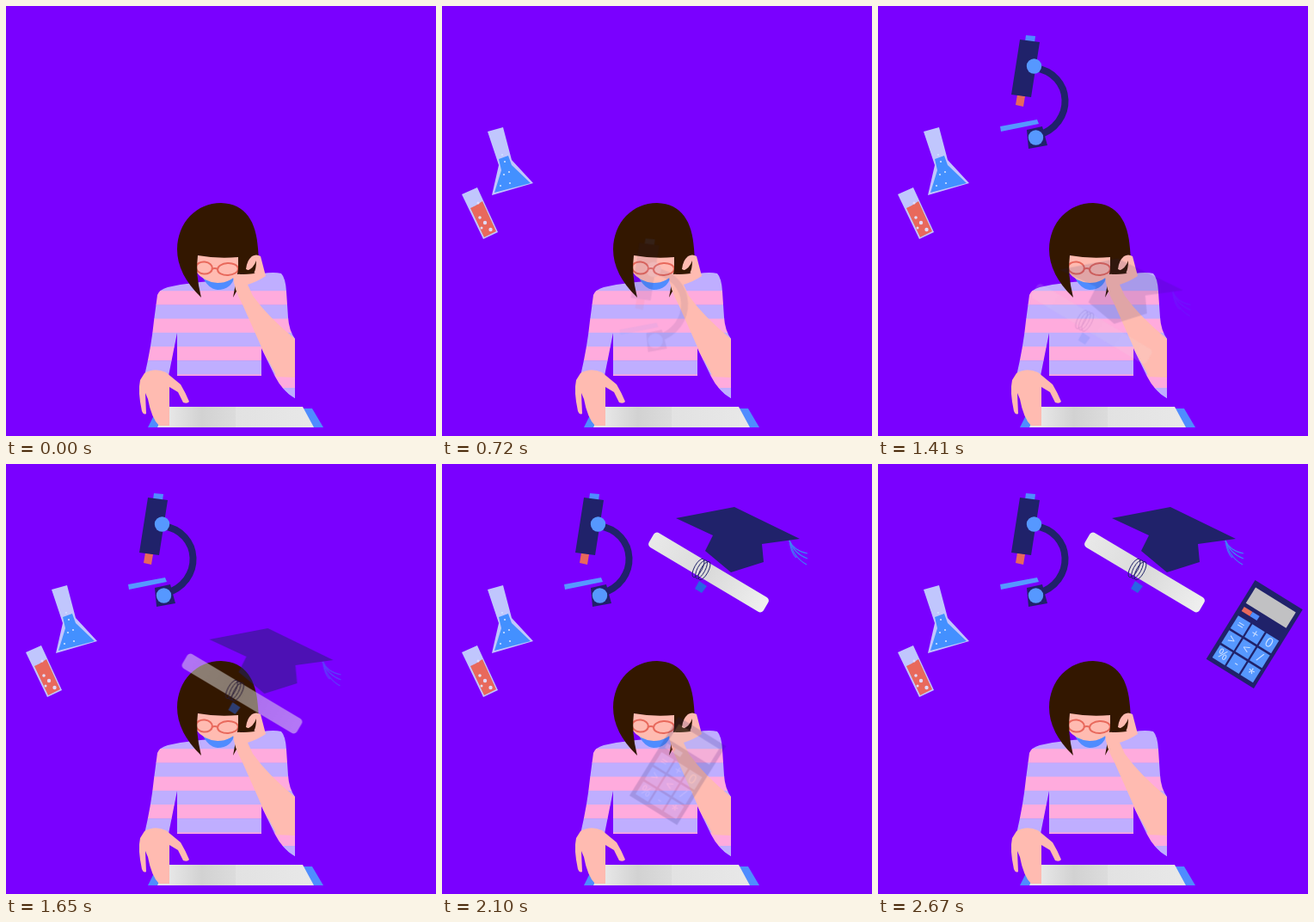
Animation of 500x500 px, one loop 2.88 s. Source, as an HTML page with a canvas:

```html
<!DOCTYPE html>
<html lang="en">
<head>
<meta charset="utf-8">
<title>Study time</title>
<style>
html, body { margin: 0; width: 100%; height: 100%; overflow: hidden; background: #7a00ff; }
canvas { display: block; width: 500px; height: 500px; }
</style>
</head>
<body>
<canvas id="stage" width="500" height="500"></canvas>
<script>
const SIZE = 500, LOOP = 2880, TICK = 30, FLIGHT = 660;
const C = {
  bg: '#7a00ff', skin: '#ffbbb1', hair: '#331700', pink: '#ffabdd', lilac: '#bfaeff',
  blue: '#4f8cff', sky: '#5698ff', navy: '#20226a', coral: '#e8695c', glass: '#c0c6fd'
};

function makeLayer() {
  const canvas = document.createElement('canvas');
  canvas.width = canvas.height = SIZE;
  return canvas;
}

function fill(g, path, color) {
  g.fillStyle = color;
  g.fill(new Path2D(path));
}

function line(g, path, color, width) {
  g.strokeStyle = color;
  g.lineWidth = width;
  g.stroke(new Path2D(path));
}

function oval(g, x, y, rx, ry = rx, turn = 0) {
  g.beginPath();
  g.ellipse(x, y, rx, ry, turn, 0, Math.PI * 2);
}

function dot(g, x, y, r, color) {
  oval(g, x, y, r);
  g.fillStyle = color;
  g.fill();
}

function shade(g, x0, y0, x1, y1, ...colors) {
  const ramp = g.createLinearGradient(x0, y0, x1, y1);
  colors.forEach((c, i) => ramp.addColorStop(i / (colors.length - 1), c));
  return ramp;
}

function drawSweater(g) {
  g.save();
  g.clip(new Path2D(`M176 336Q178 330 188 327Q206 323 226 321L266 318L298 311Q312 309 320 311
    Q325 316 326 332L328 362Q329 377 336 387V456Q321 447 313 431L297 398V430H199V380L189 430H161
    Q169 396 172 366Z`));
  for (let i = 0; i < 10; i++) {
    g.fillStyle = i % 2 ? C.pink : C.lilac;
    g.fillRect(150, 315 + i * 16.2 - (i ? 0 : 15), 200, i ? 16.7 : 32);
  }
  g.restore();
}

function drawBook(g) {
  fill(g, 'M165 490L176 468H356L369 490Z', C.blue);
  fill(g, 'M176 490L188 466H267V490Z', shade(g, 188, 0, 267, 0, '#e8e8e8', '#d2d2d2', '#dcdcdc'));
  fill(g, 'M267 466H345L358 490H267Z', shade(g, 267, 0, 355, 0, '#e2e2e2', '#e8e8e8'));
}

function drawGirl(g) {
  drawBook(g);
  drawSweater(g);
  fill(g, 'M228 314H266Q262 330 246 330Q235 329 228 314Z', C.blue);
  fill(g, 'M220 286H272V308Q262 322 246 322Q230 321 221 309Z', C.skin);

  g.strokeStyle = C.coral;
  g.lineWidth = 2;
  oval(g, 230.5, 304.5, 9.5, 7, 0.1);
  g.stroke();
  oval(g, 258, 306, 12, 7, -0.05);
  g.stroke();
  line(g, 'M239 306Q243 304 246 306', C.coral, 2);

  fill(g, `M227 339Q199 312 199 283C199.5 251 222 229 250 229C279 230 291 251 293 282L295 308L286 313
    Q275 318 264 339L270 306V292Q245 294 223 290Q220 311 227 339Z`, C.hair);

  // Raised arm and hand
  fill(g, `M264 315Q267 311 273 312L290 311L279 306Q280 296 286 291Q291 288 296 291L302 314
    Q293 320 281 324L287 337Q305 362 336 387V443Q325 440 315 431L299 401L275 347Q265 329 264 315Z`, C.skin);
  fill(g, 'M280 308Q288 305 291 296Q291 306 288 311L274 312Z', C.hair);
  fill(g, 'M314 431L336 432V444H322Z', C.pink);
  fill(g, 'M322 444H336V456Q327 451 322 444Z', C.lilac);

  // Hand on the book
  fill(g, `M161 427Q173 420 186 426L203 440Q209 450 213 460Q211 463 206 461L200 449L190 443V488H178
    Q169 479 165 457L162 450L163 474Q160 476 158 471Q153 448 156 435Z`, C.skin);
}

function drawGlassware(g) {
  fill(g, 'M53 146L71 141L81 179L106 206L58 220L66 185Z', C.glass);
  fill(g, 'M66 178L77 174L81 185L103 206L61 217L69 191Z', '#4390ff');
  [[73, 181], [78, 193], [72, 196], [79, 206], [70, 173], [68, 209]]
    .forEach(([x, y]) => dot(g, x, y, 1.1, '#cfe0ff'));
  fill(g, 'M23 219L41 211L65 263L48 271Z', C.glass);
  fill(g, 'M33 235Q40 232 47 227L63 262L49 269Z', C.coral);
  [[44, 246, 1.8], [50, 252, 2.2], [46, 258, 1.5], [56.5, 260, 2.2], [42, 229, 1.5]]
    .forEach(([x, y, r]) => dot(g, x, y, r, '#e0dcfa'));
}

function drawMicroscope(g) {
  line(g, 'M182 72C227 78 231 138 184 151', C.navy, 8);
  fill(g, 'M172 34L183 35L182 43L171 41Z', C.blue);
  fill(g, 'M162 103L171 105L169 117L160 115Z', C.coral);
  fill(g, 'M165 39L188 42L178 106L155 103Z', C.navy);
  fill(g, 'M173 144L191 140L197 162L175 166Z', C.navy);
  fill(g, 'M142 140L185 132L187 137L143 146Z', C.sky);
  dot(g, 181.5, 70, 8.7, C.sky);
  dot(g, 183.5, 153, 8.7, C.sky);
}

function drawGraduation(g) {
  fill(g, 'M272 63L340 50L416 87L372 93L374 114L336 126L306 101L315 83Z', C.navy);
  ['M404 89Q409 101 425 104', 'M404 89Q409 104 425 110', 'M404 89Q408 108 424 117', 'M404 89Q406 104 412 109']
    .forEach(p => line(g, p, '#3f80f5', 1.2));

  g.save();
  g.translate(310, 126);
  g.rotate(0.537);
  g.beginPath();
  g.roundRect(-77.5, -9.8, 155, 19.6, 4.5);
  g.fillStyle = shade(g, -77, 0, 77, 0, '#e9e9e9', '#dadada', '#efefef');
  g.fill();
  g.restore();

  g.strokeStyle = C.navy;
  g.lineWidth = 1;
  for (let i = 0; i < 3; i++) {
    oval(g, 298 + i * 3.5, 121 + i * 1.5, 4.5, 12, 0.5);
    g.stroke();
  }
  fill(g, 'M299 136L308 142L302 150L294 145Z', '#2865e4');
}

function drawCalculator(g) {
  const box = (x, y, w, h, color) => {
    g.fillStyle = color;
    g.fillRect(x, y, w, h);
  };
  g.save();
  g.translate(438.5, 135);
  g.rotate(0.554);
  box(0, 0, 65, 108, C.navy);
  box(5, 7, 55, 21.5, '#c1c1c3');
  box(5.5, 33, 11.5, 6, C.coral);
  box(17, 33, 9.5, 6, C.blue);
  g.font = '15px "Open Sans", sans-serif';
  g.textAlign = 'center';
  g.textBaseline = 'middle';
  [...'=+0><\/%-*'].forEach((sign, i) => {
    const x = 13.5 + i % 3 * 19.3, y = 54 + Math.floor(i / 3) * 20;
    box(x - 8.5, y - 8.7, 17, 17.4, C.sky);
    g.fillStyle = '#cfe0ff';
    g.fillText(sign, x, y + (sign === '*' ? 2 : 0.5));
  });
  g.restore();
}

function render(draw) {
  const layer = makeLayer();
  draw(layer.getContext('2d'));
  return layer;
}

const girl = render(drawGirl);
// Each group flies in from (dx, dy) away, one after the other.
const items = [
  { draw: drawGlassware, dx: 185, dy: 170 },
  { draw: drawMicroscope, dx: 71, dy: 260 },
  { draw: drawGraduation, dx: -71, dy: 282 },
  { draw: drawCalculator, dx: -200, dy: 194 }
].map(item => ({ ...item, layer: render(item.draw) }));

const ctx = document.getElementById('stage').getContext('2d');
const start = performance.now();

function frame() {
  const elapsed = (performance.now() - start) % LOOP;
  const time = Math.floor(elapsed / TICK) * TICK;
  ctx.globalAlpha = 1;
  ctx.fillStyle = C.bg;
  ctx.fillRect(0, 0, SIZE, SIZE);
  ctx.drawImage(girl, 0, 0);
  items.forEach(({ layer, dx, dy }, i) => {
    const p = Math.min(1, Math.max(0, time / FLIGHT - i));
    if (!p) return;
    ctx.globalAlpha = p;
    ctx.drawImage(layer, dx * (1 - p), dy * (1 - p));
  });
  requestAnimationFrame(frame);
}
frame();
</script>
</body>
</html>
```
